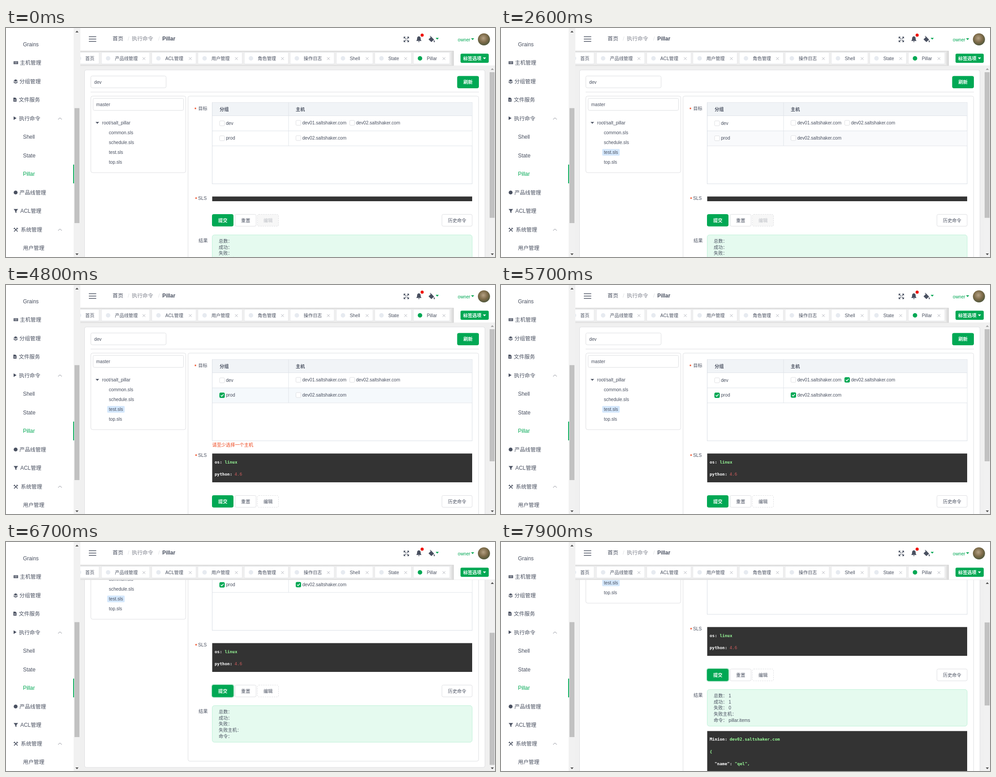
Animation, 1092 px wide and 513 px high, one loop 8000 ms. Source, as an HTML page:

```html
<!DOCTYPE html>
<html lang="zh">
<head>
<meta charset="utf-8">
<style>
  html, body { margin: 0; width: 100%; height: 100%; overflow: hidden; background: #f0f0f0; }
  svg { display: block; font-family: "Liberation Sans", "Noto Sans CJK SC", "Noto Sans CJK", sans-serif; }
  .code { font-family: "DejaVu Sans Mono", monospace; }
  .b { font-weight: bold; }
</style>
</head>
<body>
<svg width="1092" height="513" viewBox="0 0 1092 513">
  <defs>
    <radialGradient id="photo" cx=".45" cy=".4" r=".65">
      <stop offset="0" stop-color="#b5a184"/><stop offset=".55" stop-color="#7c6a48"/><stop offset="1" stop-color="#47543a"/>
    </radialGradient>
    <linearGradient id="shade" x2="0" y2="1">
      <stop offset="0" stop-color="#d6d6d6"/><stop offset=".12" stop-color="#f0f0f0"/>
      <stop offset=".88" stop-color="#f0f0f0"/><stop offset="1" stop-color="#dcdcdc"/>
    </linearGradient>
    <linearGradient id="side"><stop offset="0" stop-color="#e9e9e9"/><stop offset="1" stop-color="#d4d4d4"/></linearGradient>
  </defs>
  <g id="page"></g>
  <g id="frame"></g>
</svg>
<script>
const GREEN = '#00a854', INK = '#495060', LINE = '#dddee1', MINT = '#98fb98';

const text = (x, cy, str, fill = INK, size = 10.2, cls = '') =>
  `<text x="${x}" y="${cy + size * 0.37}" fill="${fill}" font-size="${size}" class="${cls}">${str}</text>`;
const bold = (x, cy, str, fill = INK, size) => text(x, cy, str, fill, size, 'b');
const code = (x, cy, str, fill, cls = 'b') => text(x, cy, str, fill, 9.32, 'code ' + cls);
const rect = (x, y, w, h, fill, stroke = 'none', r = 0, extra = '') =>
  `<rect x="${x}" y="${y}" width="${w}" height="${h}" rx="${r}" fill="${fill}" stroke="${stroke}" ${extra}/>`;
const circle = (x, y, r, fill, extra = '') => `<circle cx="${x}" cy="${y}" r="${r}" fill="${fill}" ${extra}/>`;
const shape = (d, fill = INK) => `<path d="${d}" fill="${fill}"/>`;
const stroke = (d, color = LINE, width = 1) => `<path d="${d}" fill="none" stroke="${color}" stroke-width="${width}"/>`;
const caret = (x, y, fill, w = 7, h = 4) => shape(`M${x - w / 2} ${y - h / 2}h${w}l${-w / 2} ${h}z`, fill);
const cross = (x, y) => stroke(`M${x - 3} ${y - 3}l6 6m0-6l-6 6`, '#a5a9b2', 0.9);

const box = (x, y, w, h, r = 4, fill = '#fff') => rect(x, y, w, h, fill, LINE, r);
const button = (x, y, w, label, fill = '#fff', ink = INK, border = LINE, extra = '') =>
  rect(x, y, w, 26.5, fill, border, 3, extra) +
  text(x + 13.5, y + 13.5, label, ink, 10.2, ink === '#fff' ? 'b' : '');
const check = (x, y, label, on) =>
  rect(x + .5, y + .5, 11, 11, on ? GREEN : '#fff', on ? GREEN : LINE, 2) +
  (on ? stroke(`M${x + 3} ${y + 6}l2.3 2.3l4-4.6`, '#fff', 1.6) : '') + text(x + 14.7, y + 5.5, label);
const required = (x, cy, label) => bold(x, cy + 2, '*', '#ed3f14') + text(x + 6.5, cy, label);

function sidebar() {
  const items = [
    [38, 'Grains'], [31, '主机管理'], [30, '分组管理'], [28.5, '文件服务'], [29, '执行命令'], [38, 'Shell'],
    [38, 'State'], [38, 'Pillar'], [30, '产品线管理'], [32, 'ACL管理'], [33, '系统管理'], [38, '用户管理']];
  const chevron = y => stroke(`M116.5 ${y + 2}l4-4l4 4`, '#80848f');
  return rect(0, 0, 151, 513, '#fff') + rect(151, 0, 15, 513, '#f1f1f1') + rect(153, 179.5, 11, 257.5, '#c1c1c1') +
    shape('M155 10l3.5-4l3.5 4z', '#505050') + caret(158.5, 507, '#505050') +
    shape('M33 -3h5l-2 4h-3z', '#fff') +
    items.map(([x, label], i) => text(x, 36.5 + 41.5 * i, label, label === 'Pillar' ? GREEN : INK, 11.9)).join('') +
    rect(150, 306, 2, 42, GREEN) + chevron(203) + chevron(452) +
    rect(17, 74.5, 10, 6.5, INK) + stroke('M18.5 76.5h7M18.5 79h7', '#fff', .8) +
    shape('M17 117.5l4.5-2.5l4.5 2.5l-4.5 2.5z') + stroke('M17 119.7l4.5 2.3l4.5-2.3M17 121.8l4.5 2.3l4.5-2.3', INK, 1.1) +
    shape('M16.5 156h4.5l2.5 2.5v6.500h-7z') + stroke('M18 160.500h4M18 162.500h4', '#fff', .8) +
    shape('M17 198l6.500 4l-6.500 4z') + circle(21.5, 368.5, 4.3, INK) +
    shape('M17 405.500h10l-3.700 4.500v4.500l-2.600-1.500v-3z') +
    stroke('M18 456l7-7M18.500 448.500l7.500 7.500', INK, 1.7) + stroke('M17 450l3-2.500M24.500 447v2.500h2.500', INK, 1.3);
}

function header() {
  const corners = [[1, 1], [-1, 1], [1, -1], [-1, -1]].map(([a, b]) => {
    const x = 894 - 6 * a, y = 25.5 - 6 * b;
    return shape(`M${x} ${y}h${4.5 * a}l${-4.5 * a} ${4.5 * b}z`) + stroke(`M${x + a} ${y + b}l${4 * a} ${4 * b}`, INK, 1.5);
  }).join('');
  return rect(166, 0, 926, 51, '#fff') + stroke('M185 19.500h16.500M185 24.800h16.500M185 30h16.500', INK, 1.5) +
    text(238, 24, '首页', INK, 11.9) + text(272, 24, '/', LINE, 11.9) + text(281, 24, '执行命令', '#80848f', 11.9) +
    text(340, 24, '/', LINE, 11.9) + bold(349, 24, 'Pillar', INK, 11.9) + corners +
    shape('M916 29q2-1.500 2-5q0-4.500 3-5q1-1.700 2 0q3 .5 3 5q0 3.500 2 5zM920 30h4q-2 3-4 0z') +
    circle(929.3, 16, 3.5, '#f00f00') +
    shape('M943.500 25.500l6-6l6.500 6.500l-6 5.500zM956 27q3 4 .5 5q-2.500-.5-.5-5z') + stroke('M947 18l4 4', INK, 1.2) +
    caret(963, 24, GREEN) + text(1009, 26, 'owner', GREEN) + caret(1042, 25, GREEN) + circle(1067.3, 25.5, 13.5, 'url(#photo)');
}

function tabs() {
  const list = [[150, 58, '首页'], [213, 108, '产品线管理'], [325.5, 99, 'ACL管理'], [428.5, 99, '用户管理'], [532, 98.5, '角色管理'],
    [634.5, 98.5, '操作日志'], [737.5, 82, 'Shell'], [823.5, 82, 'State'], [909.5, 81.5, 'Pillar']];
  return rect(166, 51, 926, 34, 'url(#shade)') + list.map(([x, w, label], i) =>
    rect(x, 54.5, w, 26, '#fff', '#e4e5e8', 2) + circle(x + (i ? 15 : 13), 68, 5, i === 8 ? GREEN : '#e6eaf0') +
    text(i ? x + 30.3 : 177, 68, label) + (i ? cross(x + w - 13, 68.5) : '')).join('') +
    rect(993, 52, 7, 32, 'url(#side)') + rect(1000, 51, 92, 33.5, '#fff') +
    rect(1015, 57.5, 63, 20.5, GREEN, 'none', 3) + bold(1021, 68, '标签选项', '#fff') + caret(1068.5, 68, '#fff');
}

// Fraction of the way from a to b, clamped.
const ramp = (t, a, b) => Math.min(1, Math.max(0, (t - a) / (b - a)));

function scrollTop(t) {
  const stops = [[7900, 187], [6000, 151], [5900, 133], [5800, 60], [0, 0]];
  return stops.find(([at]) => t >= at)[1];
}

function page(t) {
  const loaded = t >= 2700, done = t >= 7400;
  const top = scrollTop(t), shift = loaded ? 54 : 0;
  const prod = t >= 3800, host = t >= 5300;
  const rowTint = t >= 500 && t < 3400 ? '#f9fafc' : t >= 3400 && t < 5300 ? '#f5f9fc' : '#fff';
  const formEnd = done ? 985 : 588 + shift, total = formEnd + 23 - 85;
  const by = 417.5 + shift, ry = 463 + shift;
  const warning = ramp(t, 3900, 4300) * (1 - ramp(t, 5200, 5500));

  let s = box(175.5, 94, 894, formEnd + 14 - 94) + box(189.5, 107.5, 168, 26.5, 3) + text(197, 121, 'dev') +
    button(1008, 108, 47.5, '刷新', GREEN, '#fff', GREEN) + stroke('M189 143.500H1056') +
    box(189.5, 152.5, 212, 171.5) + box(194.500, 157.500, 202, 27, 3) + text(201.500, 171, 'master') +
    caret(204, 212.500, INK, 8) + text(214.500, 212, 'root/salt_pillar');
  if (t >= 2600) s += rect(226, 271, 39, 15, '#d5e8fc', 'none', 2);
  s += ['common', 'schedule', 'test', 'top'].map((name, i) => text(229.700, 234 + 22 * i, name + '.sls')).join('');

  s += box(406.500, 152.500, 649, formEnd - 152.500) + required(421, 180.500, '&#8202;&#8202;目标') +
    rect(460.500, 167, 580.500, 182, '#fff', '#d7dde4') + rect(461, 167.500, 579.500, 29, '#f1f4f7') +
    rect(461, 230.500, 579.500, 33, rowTint) +
    stroke('M461 196.500H1041M461 230.500H1041M461 264H1041M631 167V264', '#dfe3e9') +
    bold(477, 182, '分组') + bold(647, 182, '主机') +
    check(476.500, 207.500, 'dev') + check(476.500, 241, 'prod', prod) +
    check(647, 206.500, 'dev01.saltshaker.com') + check(767, 206.500, 'dev02.saltshaker.com', host) +
    check(647, 240.500, 'dev02.saltshaker.com', host);
  if (warning) s += `<g opacity="${warning}">${text(460.500, 358, '请至少选择一个主机', '#ed3f14')}</g>`;

  s += required(422.500, 381, 'SLS') + rect(460.500, 377.500, 580.500, loaded ? 64.500 : 10.500, '#333');
  if (loaded) s += code(466, 396.500, 'os:', '#fff') + code(488.500, 396.500, 'linux', MINT) +
    code(466, 423.500, 'python:', '#fff') + code(510.500, 423.500, '4.6', '#cd5c5c', '');

  if (t >= 6700) s += rect(459.500, by - 1, 49.500, 28.500, 'none', '#00a85440', 4, 'stroke-width="2"');
  const submit = t >= 6400 && t < 6700 ? '#24b46d' : GREEN;
  s += button(460.500, by, 47, '提交', submit, '#fff', submit) + button(511.500, by, 47, '重置') +
    button(561.500, by, 47, '编辑', loaded ? '#fff' : '#f7f7f7', loaded ? INK : '#bbbec4', LINE, 'stroke-dasharray="3 2"') +
    button(973.500, by, 67.500, '历史命令');

  s += text(430, ry + 13.500, '结果') + rect(460.500, ry + .5, 580.500, 82, '#e5faef', '#bdf1d7', 5);
  const values = ['1', '1', '0', '', 'pillar.items'];
  s += ['总数', '成功', '失败', '失败主机', '命令'].map((label, i) => {
    const y = ry + 14.500 + 13.600 * i;
    return text(475, y, label + '：') + (done ? text(508.300, y, values[i]) : '');
  }).join('');
  if (done) s += rect(460.500, ry + 93.500, 580.500, 420, '#333') +
    code(466, ry + 112, 'Minion:', '#fff') + code(510.500, ry + 112, 'dev02.saltshaker.com', MINT) +
    code(466, ry + 139.500, '{', MINT) + code(477, ry + 166.500, '"name":', '#fff') + code(522, ry + 166.500, '"qel",', MINT);
  if (t >= 6900 && !done) {
    const phase = ramp(t, 6800, 7400);
    s += circle(751, 512, 12 * phase, GREEN, `opacity="${1 - phase}"`);
  }

  const track = 401, thumb = track * 428 / total;
  return rect(166, 85, 926, 428, '#f0f0f0') + `<g transform="translate(0 ${-top})">${s}</g>` +
    rect(1079, 85, 13, 428, '#f1f1f1') + rect(1080, 99 + track * top / total, 11, thumb, '#c1c1c1') +
    shape('M1082.500 94l3.500-4l3.500 4z', top ? '#505050' : '#a3a3a3') + caret(1086, 507, '#505050');
}

const pageNode = document.getElementById('page');
document.getElementById('frame').innerHTML = tabs() + header() + sidebar();
let shown = -1;
function tick() {
  const t = Math.floor(performance.now() % 8000 / 100) * 100;
  if (t !== shown) pageNode.innerHTML = page(shown = t);
  requestAnimationFrame(tick);
}
tick();
</script>
</body>
</html>
```
